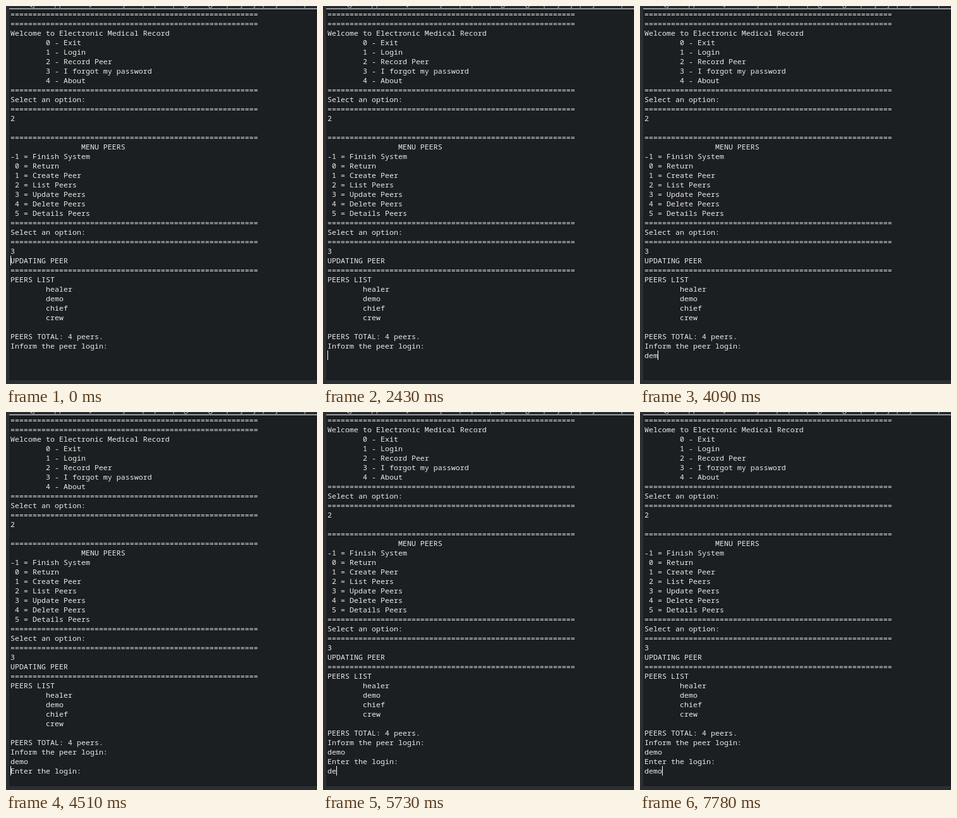
An HTML page for the animation above (8 s loop, 492 px wide and 598 px high).

```html
<!DOCTYPE html>
<html lang="en">
<head>
<meta charset="utf-8">
<title>Console session</title>
<style>
  html, body { margin: 0; width: 100%; height: 100%; overflow: hidden; background: #2f3337; }
  #stage { position: relative; width: 492px; height: 598px; overflow: hidden; background: #2b2f33; }
  #header {
    position: absolute; left: 5px; top: 0; width: 487px; height: 4px; overflow: hidden;
    background: #2b2f33; color: #c9d2dc; border-bottom: 1px solid #f4f6f8;
    font: 12px/16px "Open Sans", sans-serif; white-space: pre;
  }
  #header span { position: absolute; left: 2px; top: -12px; }
  #console {
    position: absolute; left: 5px; top: 5px; width: 487px; height: 587px;
    overflow: hidden; background: #1b1f22;
  }
  #page { position: absolute; left: 2px; top: 0; }
  #output {
    margin: 0; color: #eaeaea;
    font: 11.667px/15px "Noto Sans Mono", monospace; font-variant-ligatures: none;
  }
  #caret { position: absolute; width: 1px; height: 15px; background: #fff; }
</style>
</head>
<body>
<div id="stage">
  <div id="header"><span>Main [Java Application] C:\tools\java\.p2\pool\plugins\org.eclipse.justj.openjdk.hotspot.jre.full</span></div>
  <div id="console">
    <div id="page"><pre id="output"></pre><div id="caret"></div></div>
  </div>
</div>
<script>
  const LOOP = 8000, CHAR = 7, LINE = 15;
  const rule = "=".repeat(56);
  const tab = " ".repeat(8);
  const indent = items => items.map(item => tab + item);

  const history = [
    rule, rule,
    "Welcome to Electronic Medical Record",
    ...indent(["0 - Exit", "1 - Login", "2 - Record Peer", "3 - I forgot my password", "4 - About"]),
    rule, "Select an option:", rule, "2", "",
    rule, tab + tab + "MENU PEERS",
    "-1 = Finish System", " 0 = Return", " 1 = Create Peer", " 2 = List Peers",
    " 3 = Update Peers", " 4 = Delete Peers", " 5 = Details Peers",
    rule, "Select an option:", rule, "3",
    "UPDATING PEER", rule, "PEERS LIST",
    ...indent(["healer", "demo", "chief", "crew"]),
    "", "PEERS TOTAL: 4 peers.", "Inform the peer login:"
  ];
  const name = "demo", prompt = "Enter the login:";
  const first = history.length, second = first + 2;

  // Each step: start in ms, typed lines, caret row (null hides it), caret column, lines scrolled
  const typing = (start, text, shown = true) =>
    [start, [text], shown ? first : null, text.length, 0];
  const retyping = (start, text, shown = true) =>
    [start, [name, prompt, text], shown ? second : null, text.length, 1];

  const steps = [
    [0, [], 26, 0, 0],
    typing(270, "", false),
    typing(840, "d"),
    typing(1390, ""),
    typing(1800, "", false),
    typing(2430, ""),
    typing(2890, "", false),
    typing(3500, ""),
    typing(3790, "de"),
    typing(4090, "dem"),
    typing(4240, name),
    [4390, [name], first + 1, 0, 0],
    [4510, [name, prompt], first + 1, 0, 0],
    [4660, [name, prompt], first + 1, 0, 1],
    retyping(5120, "", false),
    retyping(5580, "d"),
    retyping(5730, "de"),
    retyping(6200, "dem"),
    retyping(6780, "demio"),
    retyping(7330, "demio", false),
    retyping(7630, "demi"),
    retyping(7780, name)
  ];

  const [page, output, caret] = ["page", "output", "caret"].map(id => document.getElementById(id));
  let current;

  function show([, typed, row, column, scrolled]) {
    output.textContent = [...history, ...typed].join("\n");
    page.style.top = -scrolled * LINE + "px";
    caret.hidden = row === null;
    caret.style.left = column * CHAR + "px";
    caret.style.top = row * LINE + "px";
  }

  function tick() {
    const time = performance.now() % LOOP;
    const step = steps.findLast(([start]) => start <= time);
    if (step !== current) show(current = step);
    requestAnimationFrame(tick);
  }
  tick();
</script>
</body>
</html>
```
